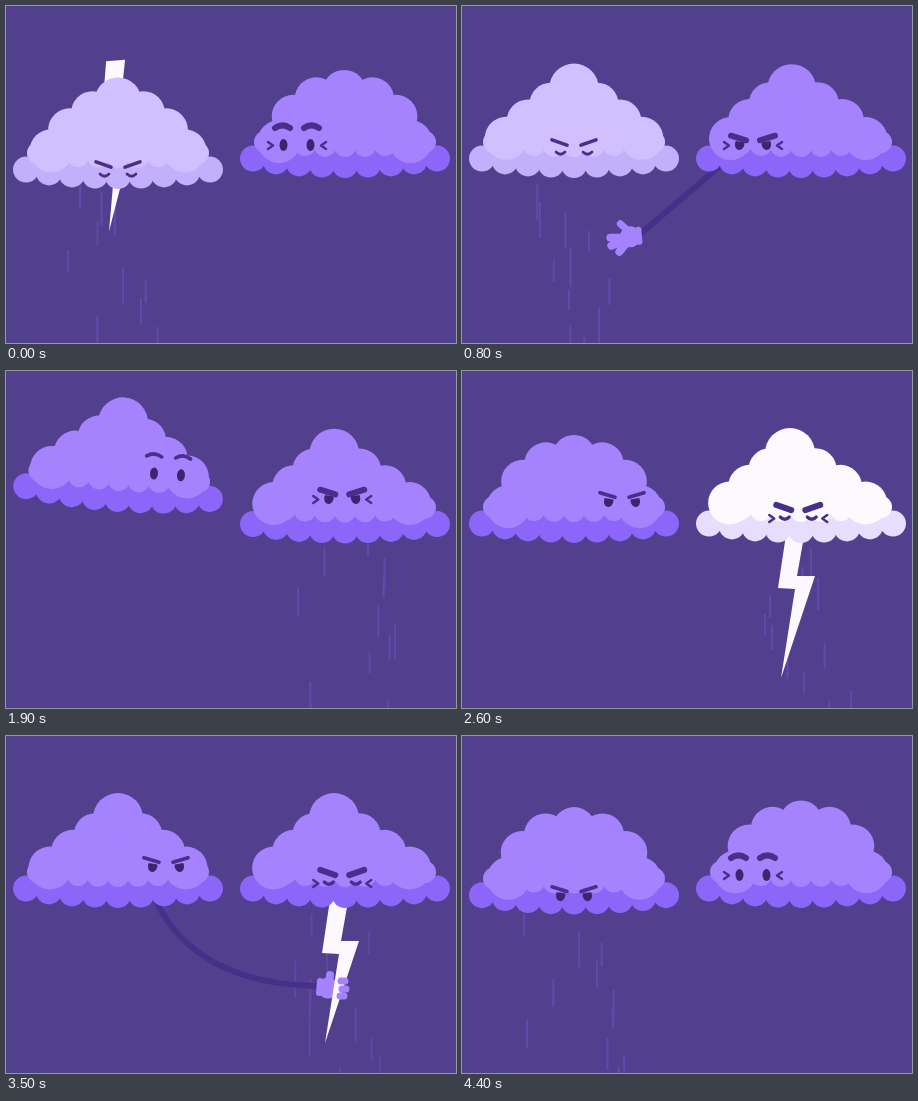
Recreate the animation shown at these times as an HTML page with a canvas. Size 450 by 337 pixels, loop 4500 ms.

```html
<!DOCTYPE html>
<html lang="en">
<head>
<meta charset="utf-8">
<title>Two storm clouds</title>
<style>
html, body { margin: 0; width: 100%; height: 100%; overflow: hidden; background: #52408f; }
canvas { display: block; width: 100vw; height: 100vh; }
</style>
</head>
<body>
<canvas id="stage"></canvas>
<script>
const W = 450, H = 337, LOOP = 4500, STEP = 100;
const SKY = '#52408f', INK = '#40236f', BROW = '#4a2f88', ARM = '#48308a', HAND = '#a583ff', RAIN = '#6349ab';
const canvas = document.getElementById('stage');
const ctx = canvas.getContext('2d');
const density = window.devicePixelRatio || 1;
canvas.width = W * density;
canvas.height = H * density;

const lerp = (a, b, k) => a + (b - a) * k;
const clamp = k => Math.min(1, Math.max(0, k));
const ease = k => k * k * (3 - 2 * k);
const ramp = (t, a, b) => ease(clamp((t - a) / (b - a)));
const span = (t, a, b, c, d) => ramp(t, a, b) * (1 - ramp(t, c, d));
const pulse = (t, at, width) => ease(clamp(1 - Math.abs(t - at) / width));
const random = seed => {
  const v = Math.sin(seed * 12.9898) * 43758.5453;
  return v - Math.floor(v);
};
const mix = (a, b, k) => `rgb(${a.map((v, i) => Math.round(lerp(v, b[i], k)))})`;

// Time since a cloud's strike, running from -900 up to 3600.
const phase = (t, strike) => ((t - strike + 900) % LOOP + LOOP) % LOOP - 900;

function disc(x, y, r) {
  ctx.beginPath();
  ctx.arc(x, y, r, 0, Math.PI * 2);
  ctx.fill();
}

function stroke(points, width, color) {
  ctx.lineWidth = width;
  ctx.strokeStyle = color;
  ctx.beginPath();
  points.forEach(p => ctx.lineTo(...p));
  ctx.stroke();
}

function curve(x0, y0, cx, cy, x1, y1, width, color) {
  ctx.lineWidth = width;
  ctx.strokeStyle = color;
  ctx.beginPath();
  ctx.moveTo(x0, y0);
  ctx.quadraticCurveTo(cx, cy, x1, y1);
  ctx.stroke();
}

const MOODS = {
  strike: { gap: -10.5, slope: 2.6, arch: 0, eye: 'closed' },
  angry: { gap: -7, slope: 2.3, arch: 0, eye: 'lid' },
  robbed: { gap: -15, slope: 0, arch: 1, eye: 'lid' },
  shock: { gap: -17, slope: 0, arch: 2.6, eye: 'open' }
};

// dir points to the other cloud; shoulder, grab and sag shape the arm.
const left = {
  x: 112, dir: 1, strike: 0, lean: 0, brow: 3.6, gazeY: -23, marks: false,
  tip: [103, 298], tilt: -4, shoulder: [150, 165], grab: [313, 250], sag: [-41, 41]
};
const right = {
  x: 339, dir: -1, strike: 2100, lean: -11, brow: 6, gazeY: -15, marks: true,
  tip: [319, 307], tilt: 0, shoulder: [258, 160], grab: [132, 246], sag: [28, 13]
};
const pairs = [[left, right], [right, left]];
const BOLT = [[9, -170], [-3, -90], [14, -89], [0, 0], [34, -102], [16, -102], [28, -170]];

function drawRain(cloud, p) {
  ctx.globalAlpha = span(p, -800, -300, 1300, 1700);
  ctx.fillStyle = RAIN;
  for (let i = 0; i < 12; i++) {
    const fall = (p + 900) / 300 + i * .618;
    const seed = i * 17 + Math.floor(fall);
    const x = cloud.x + lerp(-53, 53, random(seed));
    ctx.fillRect(x - 1, 150 + fall % 1 * 200, 2, 20 + 18 * random(seed + .5));
  }
  ctx.globalAlpha = 1;
}

function drawBolt(owner, thief, p, wrist, reach) {
  const second = p > 900;
  const start = second ? 1050 : 0;
  if (p < start - 60 || p >= (second ? 1850 : 700)) return;
  const [x, low] = owner.tip;
  ctx.save();
  if (p > 1500) {
    const size = lerp(.35, 1, reach);
    ctx.translate(...wrist);
    ctx.scale(size, size);
    ctx.translate(-thief.grab[0], -thief.grab[1]);
  }
  ctx.translate(x, lerp(200, low, ramp(p - start, -80, 160)));
  ctx.rotate(owner.tilt * Math.PI / 180);
  ctx.fillStyle = '#fbf9ff';
  ctx.beginPath();
  BOLT.forEach(point => ctx.lineTo(...point));
  ctx.fill();
  ctx.restore();
}

function drawFingers(tips, fromX, fromY, width) {
  tips.forEach(tip => stroke([[fromX ?? tip[0] + 4, fromY ?? tip[1]], tip], width, HAND));
}

function drawPalm(grip) {
  ctx.fillStyle = HAND;
  disc(-9, 2, 10.5);
  stroke([[-1, -5], [0, 7]], 6, HAND);
  if (grip) {
    stroke([[-10, 0], [-11, -11]], 8, HAND);
  } else {
    stroke([[-9, -2], [-19, -11]], 7, HAND);
    drawFingers([[-29, 3], [-28, 11], [-20, 17]], -9, 3, 8);
  }
}

function atWrist(wrist, dir, draw) {
  ctx.save();
  ctx.translate(...wrist);
  ctx.scale(-dir, 1);
  draw();
  ctx.restore();
}

// p counts from the strike of the cloud that gets robbed.
function drawTheft(owner, thief, p) {
  const { shoulder, grab, sag, dir } = thief;
  const back = 1 - ramp(p, 1500, 1800);
  const reach = (1 - (1 - clamp((p - 600) / 500)) ** 2) * back;
  const bend = ramp(p, 850, 1200) * back;
  const wrist = [lerp(shoulder[0], grab[0], reach), lerp(shoulder[1], grab[1], Math.sqrt(reach))];
  const grip = p >= 1100;

  if (reach > 0) {
    const [cx, cy] = [0, 1].map(i => (shoulder[i] + wrist[i]) / 2 + sag[i] * bend);
    curve(...shoulder, cx, cy, ...wrist, 6, ARM);
    atWrist(wrist, dir, () => drawPalm(grip));
  }
  drawBolt(owner, thief, p, wrist, reach);
  if (reach > 0 && grip) {
    atWrist(wrist, dir, () => drawFingers([[-26, -5], [-27, 3], [-25, 10]], null, null, 7));
  }
}

function drawEye(kind, side, slope, line) {
  if (kind === 'closed') {
    curve(-4.5, -1, 0, 3.5, 4.5, -1, line, BROW);
    return;
  }
  ctx.fillStyle = INK;
  ctx.beginPath();
  if (kind === 'open') {
    ctx.ellipse(0, 0, 4, 6, 0, 0, Math.PI * 2);
  } else {
    ctx.rotate(-side * slope * .07);
    ctx.ellipse(0, -1, 4.7, 6, 0, -.4, Math.PI + .4);
  }
  ctx.fill();
}

function moodAt(p, q) {
  if (p < 0) return MOODS.angry;
  if (p < 1450) return MOODS.strike;
  if (p < 1650) return MOODS.robbed;
  return q >= 400 && q < 2100 ? MOODS.angry : MOODS.shock;
}

function drawFace(cloud, p, q, dip) {
  const { gap, slope, arch, eye } = moodAt(p, q);
  const gaze = (p < 0 ? 1 : ramp(p, 1500, 1750)) * (1 - ramp(q, 1700, 1900));
  const hop = 20 * pulse(p, -200, 100);
  ctx.translate(lerp(cloud.lean / 4, cloud.dir * 48, gaze), lerp(-7, cloud.gazeY, gaze) + dip - hop);
  for (const side of [-1, 1]) {
    const mid = side * 14.5;
    curve(mid - side * 7.5, gap + slope, mid, gap - 2 * arch, mid + side * 7.5, gap - slope, cloud.brow, BROW);
    if (cloud.marks) stroke([[side * 29, -3], [side * 24, .5], [side * 29, 4]], 2.4, BROW);
    ctx.save();
    ctx.translate(side * 13.5, 0);
    drawEye(eye, side, slope, cloud.marks ? 3.2 : 2.6);
    ctx.restore();
  }
}

// The dome's lobes sit on a pointed roof or on a round arch.
function domeLobe(i, broad, lean) {
  const u = i / 3, angle = u * 1.3;
  const roofY = -72 + 50 * Math.abs(u);
  const roofX = 68 * u - lean * roofY / 72;
  const r = i ? 21.5 : lerp(25, 21.5, broad);
  return [lerp(roofX, 68 * Math.sin(angle), broad), lerp(roofY, -68 * Math.cos(angle), broad), r];
}

function drawCloud(cloud, t, p, q) {
  const flash = span(p, -100, 100, 600, 1000);
  const broad = ease(.5 + .5 * Math.cos((t - 1300) / 1500 * Math.PI * 2)) * (1 - flash);
  const pull = pulse(q, 1550, 150);
  const dip = 11 * pulse(p, 0, 230);
  const jump = 31 * pulse(p, 1900, 300);
  const tilt = cloud.dir * 4 * (pulse(p, 1900, 400) - pull);

  ctx.save();
  ctx.translate(cloud.x + cloud.dir * 5 * pull, 154 + dip + 6 * pull - jump);
  ctx.rotate(tilt * Math.PI / 180);

  ctx.fillStyle = mix([139, 102, 248], [230, 222, 252], flash ** .7);
  ctx.fillRect(-88, -12, 176, 18);
  for (let i = -4; i <= 4; i++) disc(i * 23, 5 - i * i * .4, 13);

  ctx.fillStyle = mix([165, 131, 255], [252, 250, 255], flash);
  const lobes = [-3, -2, -1, 0, 1, 2, 3].map(i => domeLobe(i, broad, cloud.lean));
  ctx.beginPath();
  ctx.moveTo(-80, -16);
  lobes.forEach(([x, y]) => ctx.lineTo(x, y));
  ctx.lineTo(80, -16);
  ctx.fill();
  lobes.forEach(lobe => disc(...lobe));
  for (let i = -4; i <= 4; i++) disc(i * 20, -14 - i * i * .25, 11);

  drawFace(cloud, p, q, dip);
  ctx.restore();
}

function draw(t) {
  ctx.setTransform(density, 0, 0, density, 0, 0);
  ctx.lineCap = ctx.lineJoin = 'round';
  ctx.fillStyle = SKY;
  ctx.fillRect(0, 0, W, H);
  const at = cloud => phase(t, cloud.strike);
  pairs.forEach(([cloud]) => drawRain(cloud, at(cloud)));
  pairs.forEach(([owner, thief]) => drawTheft(owner, thief, at(owner)));
  pairs.forEach(([cloud, rival]) => drawCloud(cloud, t, at(cloud), at(rival)));
}

const begin = performance.now();
function tick() {
  const t = performance.now() - begin + 1;
  draw(Math.floor(t / STEP) * STEP % LOOP);
  requestAnimationFrame(tick);
}
tick();
</script>
</body>
</html>
```
